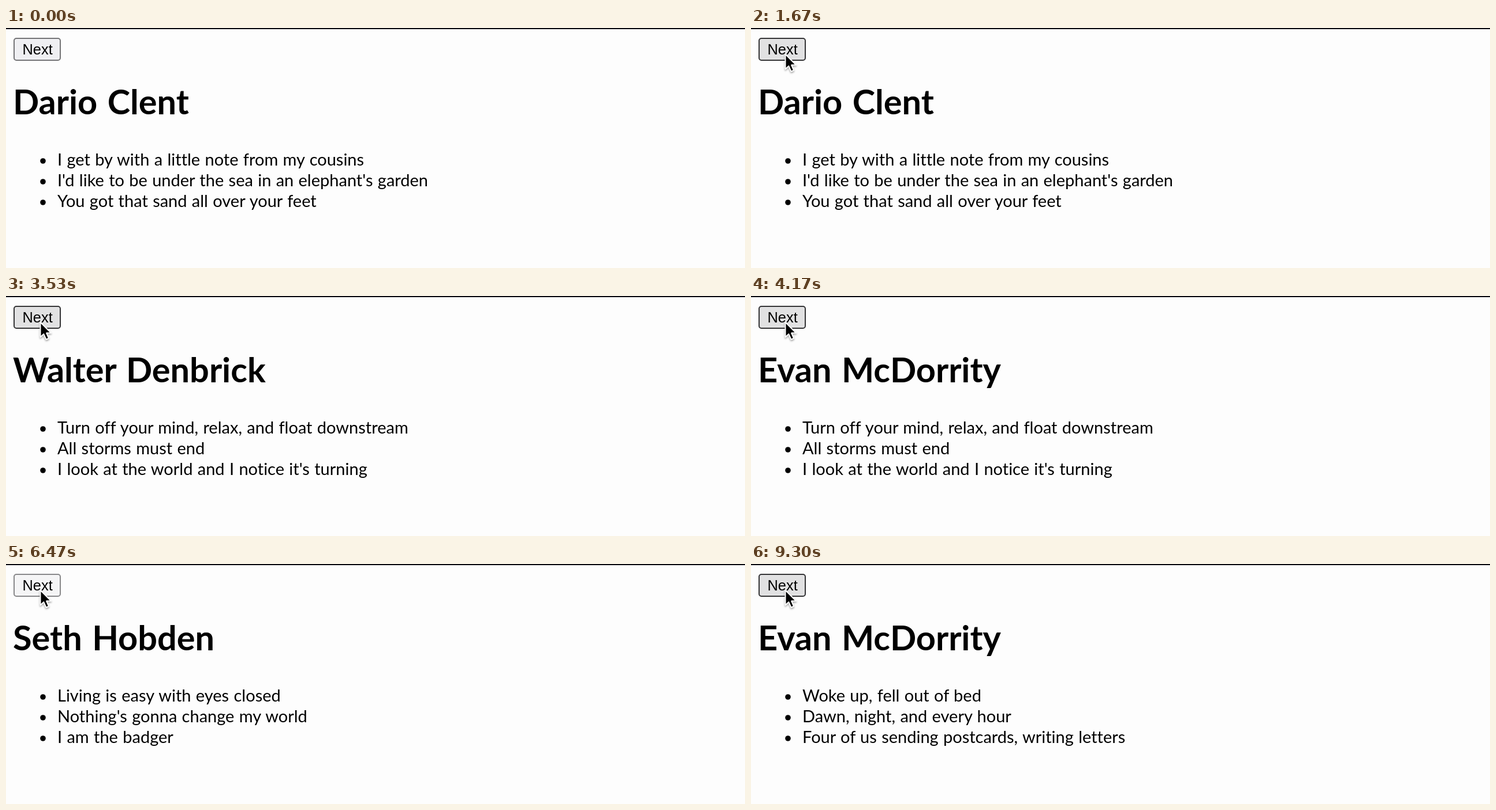
Recreate the animation shown at these times as an HTML page. Size 1280x417 px, loop 9330 ms.

```html
<!DOCTYPE html>
<html lang="en">
<head>
<meta charset="utf-8">
<title>Next</title>
<style>
  html, body { margin: 0; width: 100%; height: 100%; overflow: hidden; background: #fdfdfd; }
  svg { display: block; width: 1280px; height: 417px; }
  text { font-family: Lato, sans-serif; font-variant-ligatures: none; }
  #name { font-size: 59.5px; font-weight: 700; word-spacing: 3px; }
  .line { font-size: 29px; word-spacing: .9px; }
  #label { font: 25.4px "Liberation Sans", Arial, sans-serif; }
  #button { stroke-width: 2; }
  #cursor { filter: drop-shadow(0 2px 1.5px rgba(0, 0, 0, .35)); }
</style>
</head>
<body>
<svg viewBox="0 0 1280 417">
  <rect width="1280" height="2" fill="#08080f"/>
  <rect id="button" x="14" y="18" width="80" height="38" rx="4"/>
  <text id="label" x="28.5" y="46">Next</text>
  <text id="name" x="12" y="150"></text>
  <g id="list"></g>
  <path id="cursor" d="M0 0V26L5.8 20.6L10 30L14.6 28L10.6 18.8H18.6Z"
        stroke="#fff" stroke-width="2" stroke-linejoin="round"/>
</svg>
<script>
const LOOP = 9330;
const PRESS = 80;
const names = ["Seth Hobden", "Evan McDorrity", "Walter Denbrick", "Dario Clent"];
const quotes = [
  ["Living is easy with eyes closed", "Nothing's gonna change my world", "I am the badger"],
  ["Woke up, fell out of bed", "Dawn, night, and every hour", "Four of us sending postcards, writing letters"],
  ["Turn off your mind, relax, and float downstream", "All storms must end", "I look at the world and I notice it's turning"],
  ["I get by with a little note from my cousins", "I'd like to be under the sea in an elephant's garden", "You got that sand all over your feet"]
];
// The list lags behind the heading: [time, index]
const listChanges = [[0, 3], [2800, 2], [4750, 0], [7880, 1]];

// Click rhythm: [first click time, interval, count]
const clicks = [[2060, 233, 7], [3690, 189, 7], [5010, 216, 7], [6520, 240, 5]]
  .flatMap(([start, gap, count]) => Array.from({ length: count }, (_, i) => start + i * gap));

const looks = {
  normal: ["#efeff2", "#747476"],
  hover: ["#e1e1e2", "#343436"],
  active: ["#f5f5f6", "#88888a"]
};

const $ = id => document.getElementById(id);
const button = $("button"), heading = $("name"), list = $("list"), cursor = $("cursor");

list.innerHTML = [0, 1, 2].map(i =>
  `<circle cx="64" cy="${231 + 36 * i}" r="4.8"/><text class="line" x="89" y="${239 + 36 * i}"></text>`
).join("");
const lines = list.querySelectorAll("text");

function setText(node, value) {
  if (node.textContent !== value) node.textContent = value;
}

function draw(t) {
  const p = Math.min(Math.max((t - 30) / 1220, 0), 1);
  const ease = p * p * (3 - 2 * p);
  const x = 1030 + (59.5 - 1030) * ease;
  const y = 420 + (45.5 - 420) * ease;
  cursor.setAttribute("transform", `translate(${x} ${y})`);

  const over = x < 95 && y < 57;
  const pressed = clicks.some(c => t >= c - PRESS && t < c);
  const [fill, stroke] = looks[pressed ? "active" : over ? "hover" : "normal"];
  button.setAttribute("fill", fill);
  button.setAttribute("stroke", stroke);

  const count = clicks.filter(c => c <= t).length;
  setText(heading, names[(3 + count) % 4]);
  const shown = listChanges.filter(([at]) => at <= t).pop()[1];
  lines.forEach((line, i) => setText(line, quotes[shown][i]));
}

const start = performance.now();
function frame() {
  draw((performance.now() - start) % LOOP);
  requestAnimationFrame(frame);
}
frame();
</script>
</body>
</html>
```
